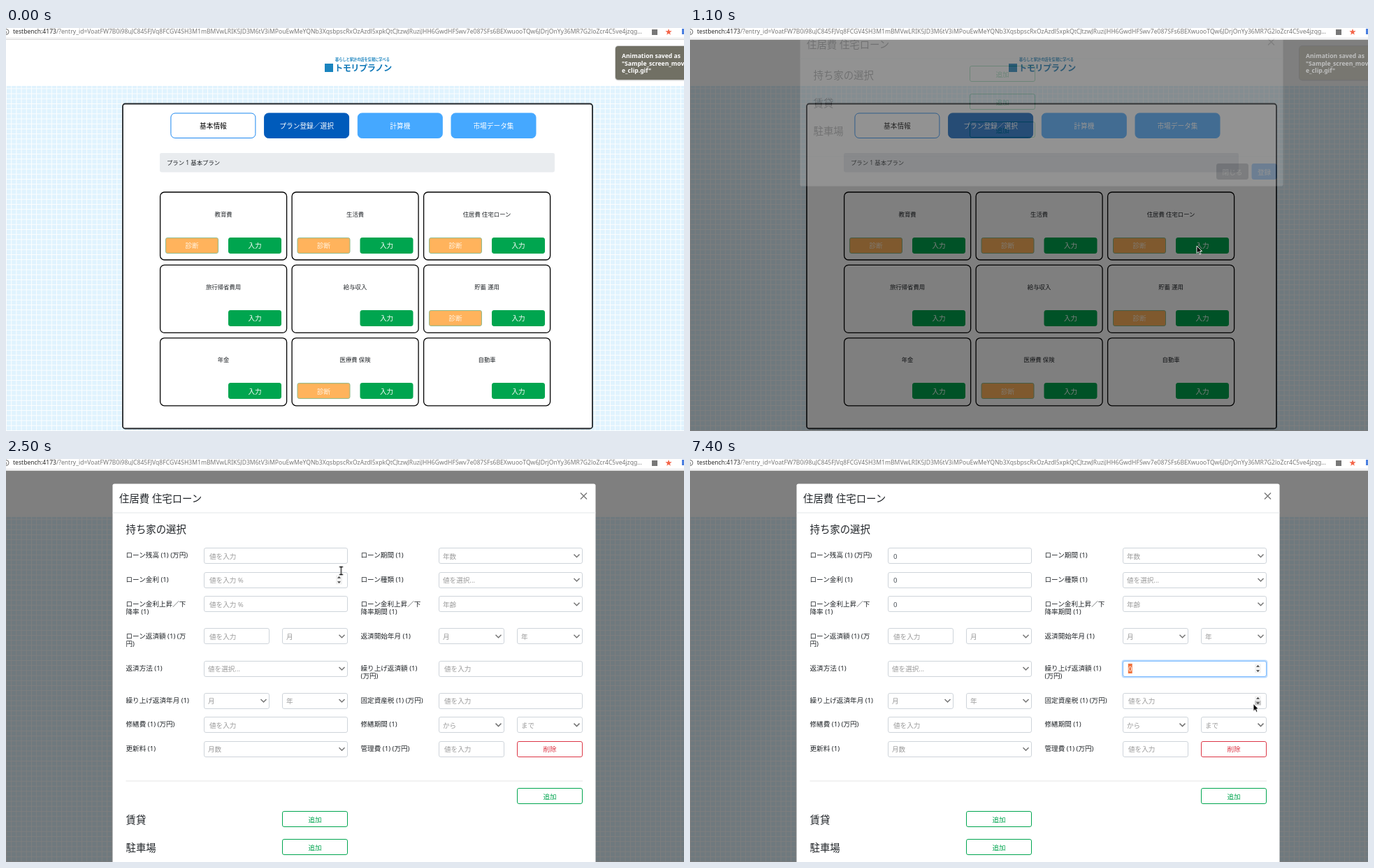
Write an HTML page that moves like this. It is 970x577 px and loops after 8000 ms.

```html
<!DOCTYPE html>
<html lang="ja">
<head>
<meta charset="utf-8">
<title>Form demo</title>
<style>
html, body { margin: 0; width: 100%; height: 100%; overflow: hidden; background: #fff; }
body { position: relative; }
svg { position: absolute; left: 0; top: 0; width: 970px; height: 577px; }
text { font-family: "Noto Sans", "Noto Sans CJK JP", "Noto Sans CJK", sans-serif; white-space: pre; }
#address {
  position: absolute; left: 10px; top: 0; width: 901px; height: 12px;
  overflow: hidden; white-space: nowrap; text-overflow: ellipsis;
  font: 8.6px/11px "Noto Sans", sans-serif; color: #777;
}
#address b { font-weight: 400; color: #2b2b2b; }

.timed { animation: 8s step-end -5ms infinite; }
.shade { animation-name: shade; }
.toast { animation-name: toast; }
.modal { animation-name: modal; }
.cursor { animation-name: cursor; }
@keyframes shade { 0% { opacity: 0 } 12.5% { opacity: .39 } 13.75% { opacity: .5 } }
@keyframes toast { 0% { opacity: 1 } 13.75% { opacity: .5 } 15% { opacity: 0 } }
@keyframes modal {
  0% { opacity: 0; transform: translate(5px, -36px) }
  13.75% { opacity: .15; transform: translate(5px, -33px) }
  15% { opacity: .95; transform: translate(5px, -14px) }
  16.25% { opacity: 1; transform: translate(5px, -3.5px) }
  17.5% { opacity: 1; transform: translate(5px, 0) }
  27.5% { opacity: 1; transform: translate(0, 0) }
}
</style>
</head>
<body>
<svg id="stage" viewBox="0 0 970 577"></svg>
<div id="address"><b>testbench:4173</b></div>
<script>
const LOOP = 8000, OPEN = 2200;
const INK = '#212529', HINT = '#9a9a9a', GREEN = '#00a54f', RED = '#dc3545';
const css = [];
const pct = ms => ms / LOOP * 100 + '%';

const rect = (x, y, w, h, fill, extra = '') =>
  `<rect x="${x}" y="${y}" width="${w}" height="${h}" fill="${fill}" ${extra}/>`;
const text = (x, cy, size, str, fill = INK, extra = '') =>
  `<text x="${x}" y="${cy}" dy=".38em" font-size="${size}" fill="${fill}" ${extra}>${str}</text>`;
const middle = (x, cy, size, str, fill) => text(x, cy, size, str, fill, 'text-anchor="middle"');
const path = (d, stroke, width, fill = 'none') =>
  `<path d="${d}" fill="${fill}" stroke="${stroke}" stroke-width="${width}"/>`;
const button = (x, cy, w, label, fill, line, color) =>
  rect(x + .5, Math.round(cy - 11.5) + .5, w - 1, 22, fill, `rx="2.4" stroke="${line}"`) +
  middle(x + w / 2, cy + .4, 9.6, label, color);
const outline = (x, cy, w, label, color) => button(x, cy, w, label, '#fff', color, color);

// Shows its content only from a to b, in ms.
function during(a, b, body) {
  const name = `from${a}to${b}`;
  css.push(`@keyframes ${name}{0%{opacity:0}${pct(a)}{opacity:1}${pct(b)}{opacity:0}}`);
  return `<g class="timed" style="animation-name:${name}">${body}</g>`;
}

function browserBar() {
  const star = Array.from({ length: 10 }, (_, i) => {
    const r = i % 2 ? 2 : 4.8, a = i * Math.PI / 5;
    return `${(948 + r * Math.sin(a)).toFixed(1)},${(5.8 - r * Math.cos(a)).toFixed(1)}`;
  }).join(' ');
  return rect(0, 0, 970, 17, '#fff') + rect(0, 13.5, 970, 3.5, '#f1f1f2') + rect(0, 16, 970, 1, '#dcdcdc') +
    '<circle cx="0" cy="5.5" r="4" fill="none" stroke="#666"/>' + rect(-.5, 4.5, 1.2, 3.5, '#666') +
    rect(924, 2, 8, 8, '#777') + `<polygon points="${star}" fill="#f4664a"/>` + rect(967, 1, 3, 8, '#4a7fe0');
}

function cell(col, row, title, check) {
  const x = 220.6 + col * 188.5, y = 235 + row * 104.4;
  return rect(x, y, 181, 97, '#fff', 'rx="6" stroke="#000" stroke-width="1.3"') +
    middle(x + 90.5, y + 31.5, 8.4, title) +
    (check ? button(x + 7.4, y + 76, 76, '診断', '#ffb35c', '#8fb98a', '#fff4e4') : '') +
    button(x + 97.4, y + 76, 76, '入力', GREEN, GREEN, '#fff');
}

function page() {
  const tabs = [
    ['基本情報', '#fff', '#1b87f0', '#000'], ['プラン登録／選択', '#005bbb', '#005bbb', '#fff'],
    ['計算機', '#45a8ff', '#45a8ff', '#fff'], ['市場データ集', '#45a8ff', '#45a8ff', '#fff']
  ];
  const cells = ['教育費*', '生活費*', '住居費 住宅ローン*', '旅行帰省費用', '給与収入', '貯蓄 運用*', '年金', '医療費 保険*', '自動車'];
  return '<defs><pattern id="grid" width="7.2" height="7.2" patternUnits="userSpaceOnUse">' +
    rect(0, 0, 7.2, 7.2, '#e0f3fe') + path('M0 .5H7.2M.5 0V7.2', '#fff', .9) + '</pattern></defs>' +
    rect(0, 17, 970, 66, '#fff') + rect(0, 83, 970, 494, 'url(#grid)') +
    rect(456, 51, 12, 12, '#1a84bf') +
    text(471, 45, 5.2, '暮らしと家計の話を気軽に学べる', '#1a84bf', 'font-weight="700"') +
    text(470, 57.3, 12.2, 'トモリプラノン', '#1279b8', 'font-weight="900" letter-spacing="-.5"') +
    rect(167, 108.5, 672, 465, '#fff', 'rx="3.5" stroke="#212529" stroke-width="1.8"') +
    tabs.map(([label, fill, line, color], i) => {
      const x = 235.9 + i * 133.7;
      return rect(x, 122, 121, 35.5, fill, `rx="6" stroke="${line}"`) + middle(x + 60.5, 140.3, 9.7, label, color);
    }).join('') +
    rect(220, 179, 565, 27.5, '#e9ecef', 'rx="2.4"') + text(230, 193, 8.4, 'プラン 1 基本プラン') +
    cells.map((c, i) => cell(i % 3, Math.floor(i / 3), c.replace('*', ''), c.endsWith('*'))).join('');
}

function toast() {
  const line = (cy, str) => text(881, cy, 8.6, str, '#fff', 'font-weight="700"');
  return '<g class="timed toast">' +
    rect(871, 25, 120, 50.5, '#000', 'rx="5" opacity=".18"') +
    rect(872, 26, 120, 48, '#717064', 'rx="4"') +
    line(40, 'Animation saved as') + line(50.5, '"Sample_screen_mov') + line(60.5, 'e_clip.gif"') + '</g>';
}

const frame = (x, cy, w) =>
  rect(x + .5, Math.round(cy - 11.5) + .5, w - 1, 22, '#fff', 'rx="2.4" stroke="#ced4da"');
const hint = (x, cy, str) => text(x + 8, cy + .5, 9.6, str, HINT);
const input = (x, cy, w, str) => frame(x, cy, w) + hint(x, cy, str);
const select = (x, cy, w, str) => frame(x, cy, w) + text(x + 6, cy + .5, 9.6, str, HINT) +
  path(`M${x + w - 12.5} ${cy - 2}l4 4l4 -4`, '#757575', 1.5);

// Number field whose value becomes 0 at the given time.
const entry = (x, cy, str, at) => frame(x, cy, 206) + during(0, at, hint(x, cy, str)) +
  during(at, LOOP, text(x + 8, cy + .5, 9.6, '0', '#495057'));
const focus = (x, cy, a, b, glow) => {
  const y = Math.round(cy - 11.5);
  return during(a, b,
    rect(x - glow / 2, y - glow / 2, 206 + glow, 23 + glow, 'none', `rx="3.2" stroke="#007bff" stroke-opacity=".27" stroke-width="${glow}"`) +
    rect(x + .5, y + .5, 205, 22, 'none', 'rx="2.4" stroke="#80bdff"'));
};
const selected = (x, cy, a, b) => during(a, b,
  rect(x + 7.8, cy - 7, 5.9, 14, '#f0733f') + text(x + 8, cy + .5, 9.6, '0', '#fff'));
const spinner = (x, cy, a, b, hover) => during(a, b,
  rect(x + 189, cy - 6.5, 9, 13, '#f2f2f2') + (hover ? rect(x + 189, cy, 9, 6.5, '#cbcbcb') : '') +
  `<path d="M${x + 191} ${cy - 2.2}h5l-2.5 -2.8zM${x + 191} ${cy + 2.2}h5l-2.5 2.8z" fill="#444"/>`);

function smallBody() {
  return rect(152.5, 35.5, 691, 224, '#fff', 'rx="2.8"') +
    ['持ち家の選択', '賃貸', '駐車場'].map((s, i) =>
      text(171.5, 100.5 + i * 40, 14.4, s) + outline(395, 98.5 + i * 40, 94, '追加', GREEN)).join('') +
    rect(152.5, 216.5, 691, 1, '#e4e7ea') +
    button(748, 238.5, 46, '閉じる', '#6c757d', '#6c757d', '#fff') +
    button(798.5, 238.5, 36, '登録', '#007bff', '#007bff', '#fff');
}

function largeBody() {
  const y = [138.5, 173, 207.7, 253.8, 300, 346, 380.6, 415.2];
  const L = 283, L2 = 395, R = 619, R2 = 731, full = 206, half = 94;
  const labels = [
    ['ローン残高 (1) (万円)', 'ローン期間 (1)'],
    ['ローン金利 (1)', 'ローン種類 (1)'],
    ['ローン金利上昇／下|降率 (1)', 'ローン金利上昇／下|降率期間 (1)'],
    ['ローン返済額 (1) (万|円)', '返済開始年月 (1)'],
    ['返済方法 (1)', '繰り上げ返済額 (1)|(万円)'],
    ['繰り上げ返済年月 (1)', '固定資産税 (1) (万円)'],
    ['修繕費 (1) (万円)', '修繕期間 (1)'],
    ['更新料 (1)', '管理費 (1) (万円)']
  ];
  const label = (x, cy, str) => str.split('|').map((s, i) => text(x, cy - .8 + i * 11.3, 9.6, s)).join('');
  return rect(152.5, 35.5, 691, 560, '#fff', 'rx="2.8"') + text(171.5, 100.5, 14.4, '持ち家の選択') +
    labels.map(([a, b], i) => label(171.5, y[i], a) + label(507.5, y[i], b)).join('') +

    entry(L, y[0], '値を入力', 4200) + select(R, y[0], full, '年数') +
    during(4200, 4300, rect(L + .5, 127.5, 205, 22, 'none', 'rx="2.4" stroke="#a3cdf2"')) +

    entry(L, y[1], '値を入力 %', 4200) + select(R, y[1], full, '値を選択...') +
    focus(L, y[1], 4200, 4300, 1.4) + focus(L, y[1], 4300, 6300, 2) +
    during(4200, 4300, rect(L + 13.6, y[1] - 6, .9, 13, '#333')) + selected(L, y[1], 4300, 6300) +
    spinner(L, y[1], 2400, 4200) + spinner(L, y[1], 4200, 4300, true) + spinner(L, y[1], 4300, 6300) +

    entry(L, y[2], '値を入力 %', 6300) + select(R, y[2], full, '年齢') +
    focus(L, y[2], 6300, 7400, 2) + selected(L, y[2], 6300, 7400) +
    spinner(L, y[2], 4400, 4600) + spinner(L, y[2], 4600, 6300, true) + spinner(L, y[2], 6300, 7400) +

    input(L, y[3], half, '値を入力') + select(L2, y[3], half, '月') +
    select(R, y[3], half, '月') + select(R2, y[3], half, '年') +

    select(L, y[4], full, '値を選択...') + entry(R, y[4], '値を入力', 7400) +
    focus(R, y[4], 7400, LOOP, 1.4) + selected(R, y[4], 7400, LOOP) + spinner(R, y[4], 6300, LOOP) +

    select(L, y[5], half, '月') + select(L2, y[5], half, '年') + input(R, y[5], full, '値を入力') +
    spinner(R, y[5], 7400, LOOP, true) +

    input(L, y[6], full, '値を入力') + select(R, y[6], half, 'から') + select(R2, y[6], half, 'まで') +
    select(L, y[7], full, '月数') + input(R, y[7], half, '値を入力') + outline(R2, y[7], half, '削除', RED) +

    rect(171.5, 460.5, 653.5, 1, '#e6e6e6') + outline(R2, 482.5, half, '追加', GREEN) +
    text(171.5, 517, 14.4, '賃貸') + outline(L2, 515.5, half, '追加', GREEN) +
    text(171.5, 557, 14.4, '駐車場') + outline(L2, 555.5, half, '追加', GREEN);
}

function modal() {
  return '<g class="timed modal">' + during(0, OPEN, smallBody()) + during(OPEN, LOOP, largeBody()) +
    text(162, 57, 14.4, '住居費 住宅ローン') + rect(152.5, 76.5, 691, 1, '#e4e7ea') +
    path('M822 48.5l9 9M831 48.5l-9 9', '#777', 1.4) + '</g>';
}

function cursor() {
  const stops = [
    [0, 1000, 430], [200, 962, 410], [300, 925, 385], [400, 880, 362], [500, 835, 342], [600, 798, 327],
    [700, 772, 317], [800, 757, 312], [900, 749, 310.5], [1000, 748.5, 310.5], [1100, 725, 312],
    [1200, 678, 309], [1300, 621.5, 303.5], [1400, 565, 280], [1500, 525, 240], [1600, 498, 195],
    [1700, 478, 155], [1800, 465, 125], [1900, 457, 108], [2000, 453, 100], [2100, 452, 98],
    [2300, 458, 112], [2400, 470, 140], [2500, 479.5, 160], [4200, 474, 174.5], [4300, 473, 190],
    [4400, 472, 202], [4600, 472.5, 205], [4700, 473.5, 207.5], [4900, 474.5, 208],
    [6300, 820.5, 307], [7400, 806, 350.5]
  ];
  css.push('@keyframes cursor{' + stops.map(([t, x, y]) => `${pct(t)}{transform:translate(${x}px,${y}px)}`).join('') + '}');
  const arrow = path('M0 0V10.5L2.5 8.3L4.2 12L6 11.2L4.4 7.6H7.6Z', '#fff', .9, '#000');
  const bar = 'M-2.5 -5.5H2.5M0 -5.5V5.5M-2.5 5.5H2.5';
  const beam = path(bar, '#fff', 2.6) + path(bar, '#111', 1.3);
  return '<g class="timed cursor">' + during(0, 2400, arrow) + during(2400, 4200, beam) +
    during(4200, 6300, arrow) + during(6300, 7400, beam) + during(7400, LOOP, arrow) + '</g>';
}

function token(length) {
  const chars = 'ABCDEFGHIJKLMNOPQRSTUVWXYZabcdefghijklmnopqrstuvwxyz0123456789';
  let seed = 29, out = '';
  while (out.length < length) {
    seed = (seed * 16807) % 2147483647;
    out += chars[seed % chars.length];
  }
  return out;
}

document.getElementById('address').append('/?entry_id=' + token(220));
document.getElementById('stage').innerHTML = page() +
  rect(0, 17, 970, 560, '#000', 'class="timed shade"') + browserBar() + toast() + modal() + cursor();
document.head.appendChild(document.createElement('style')).textContent = css.join('\n');
</script>
</body>
</html>
```
